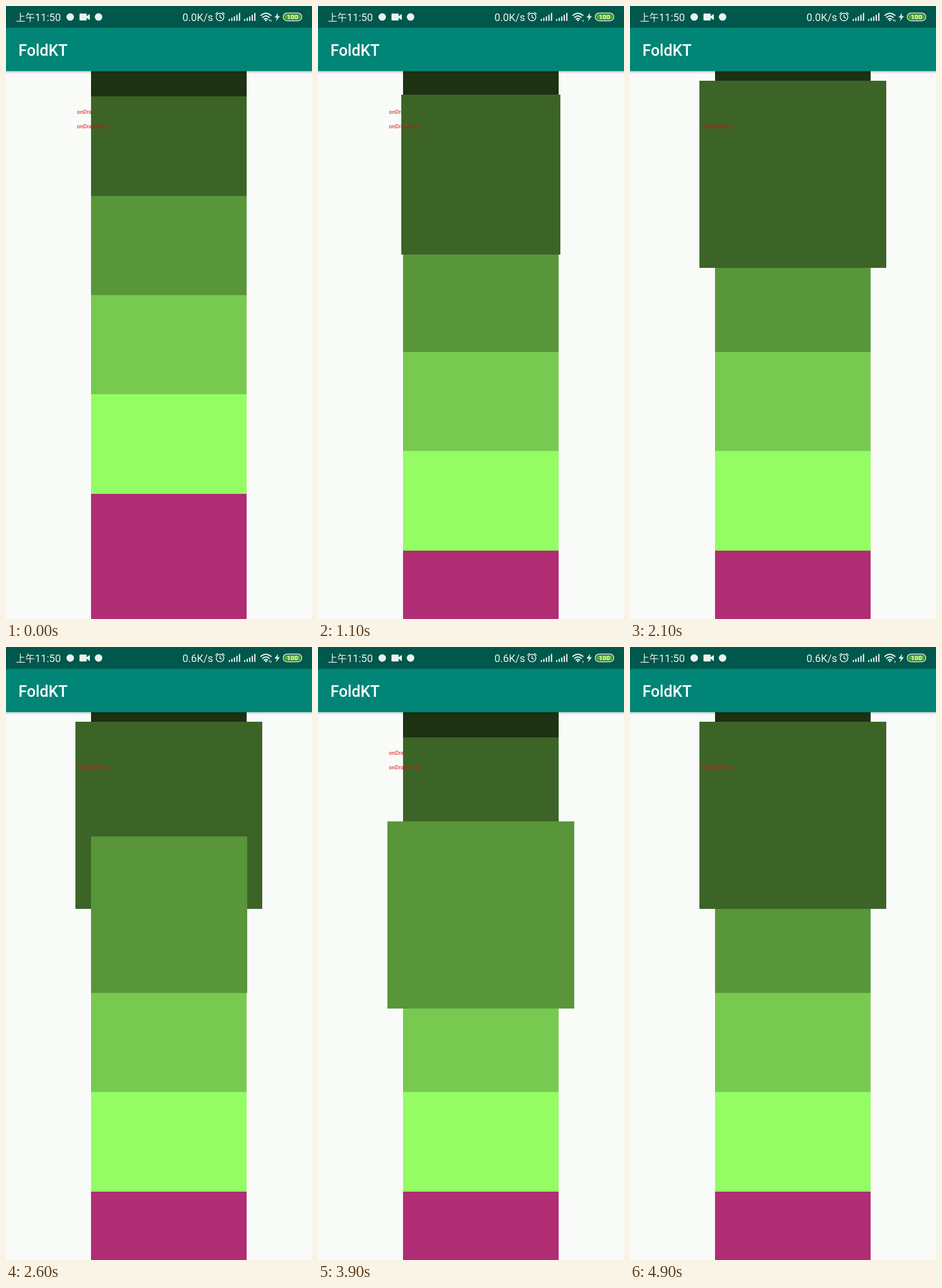
An HTML page that plays this animation: 529x1058 px, repeating every 5 s.

```html
<!DOCTYPE html>
<html lang="zh">
<head>
<meta charset="utf-8">
<style>
  html, body { margin: 0; width: 100%; height: 100%; overflow: hidden; background: #f9fbf9; }
  svg { display: block; width: 100vw; height: 100vh; font-family: Roboto, "Noto Sans CJK SC", "Noto Sans CJK", sans-serif; }
  .note { font-size: 9.8px; fill: #d21212; }
  .line { fill: none; stroke: #e8f2f0; stroke-linecap: round; }
</style>
</head>
<body>
<svg viewBox="0 0 529 1058">
  <defs>
    <linearGradient id="shade" x2="0" y2="1">
      <stop stop-color="#000" stop-opacity=".16"/>
      <stop offset="1" stop-color="#000" stop-opacity="0"/>
    </linearGradient>
    <g id="bars">
      <path d="M0 22.5h2.2v3.2h-2.2zM4.4 20.5h2.2v5.2h-2.2zM8.8 18h2.2v7.7h-2.2zM13.2 15.2h2.2v10.5h-2.2zM17.6 12h2.2v13.7h-2.2z"/>
    </g>
  </defs>
  <rect width="529" height="1058" fill="#f9fbf9"/>
  <text class="note" x="122.5" y="186.1">onDraw</text>
  <g id="items" shape-rendering="crispEdges"></g>
  <text class="note" x="122.5" y="210.6">onDrawOver</text>

  <rect y="112.5" width="529" height="5" fill="url(#shade)"/>
  <rect width="529" height="112.5" fill="#008577"/>
  <rect width="529" height="37.5" fill="#00574b"/>
  <text x="21.5" y="85.5" font-size="26.9" font-weight="500" fill="#fff">FoldKT</text>

  <g fill="#e8f2f0">
    <text x="17" y="26" font-size="16.5">上午</text>
    <text x="50" y="26" font-size="18">11:50</text>
    <circle cx="111" cy="19" r="6.5"/>
    <circle cx="160" cy="19" r="6.5"/>
    <rect x="127" y="13" width="12.5" height="12" rx="1.5"/>
    <path d="M139 18l6-4.5v11l-6-4.5z"/>
    <text id="speed" x="305" y="26" font-size="18"></text>
    <g class="line" stroke-width="1.5">
      <circle cx="370" cy="19" r="6.6"/>
      <path d="M370 15.5v4l2.8 1.2M362.4 14l3.4-2.8M377.6 14l-3.4-2.8"/>
    </g>
    <use href="#bars" x="385"/>
    <use href="#bars" x="411.5"/>
    <g class="line" stroke-width="2.1">
      <path d="M440.5 16.3q8.8-7.6 17.6 0M443.5 19.7q5.8-5 11.6 0M446.4 22.8q2.9-2.4 5.8 0"/>
    </g>
    <circle cx="449.3" cy="24.8" r="1.5"/>
    <path id="up" d="M454.4 24.6l1.4-2 .9 2h-.8v2h-.9v-2z"/>
    <path d="M457.6 23.4h.9v2h.8l-1.3 2-1.2-2h.8z"/>
    <path d="M470.5 11.8l-6.2 8.2h4l-1.8 6.2 7-8.6h-4.2z"/>
    <rect x="479.3" y="12.2" width="31.9" height="13.2" rx="6.6" fill="none" stroke="#e8f2f0" stroke-width="1.5"/>
    <rect x="481.3" y="14.2" width="27.9" height="9.2" rx="4.6" fill="#5dae20"/>
    <text x="495.3" y="22.9" font-size="11.3" font-weight="700" text-anchor="middle">100</text>
  </g>
</svg>
<script>
const LOOP = 5000, TICK = 100, GROW = 300;
const SIZE = 269.4, STEP = 171.43, CENTER = 281.6, TOP = -15.3;
const colors = ["#1d3113", "#3c6427", "#589639", "#78c950", "#94fd64", "#b12d74"];
// Moments at which an item takes the focus
const focus = [{ at: 1035, item: 1 }, { at: 2580, item: 2 }, { at: 4000, item: 1 }];

const byId = id => document.getElementById(id);
const list = byId("items"), speed = byId("speed"), up = byId("up");
const rects = colors.map(color => {
  const rect = document.createElementNS("http://www.w3.org/2000/svg", "rect");
  rect.setAttribute("fill", color);
  return list.appendChild(rect);
});

const ease = p => 0.5 - Math.cos(Math.PI * Math.min(1, Math.max(0, p))) / 2;

function place(rect, i, scale) {
  const side = SIZE * scale, middle = TOP + STEP * i + SIZE / 2;
  rect.setAttribute("x", CENTER - side / 2);
  rect.setAttribute("y", middle - side / 2);
  rect.setAttribute("width", side);
  rect.setAttribute("height", side);
}

// Ascending up to the focused item, the rest reversed, focused item on top
function drawOrder(selected) {
  const order = rects.map((_, i) => i);
  if (selected < 0) return order;
  return [...order.slice(0, selected), ...order.slice(selected).reverse()];
}

function draw(t) {
  const scales = colors.map(() => 1);
  let selected = -1;
  for (const { at, item } of focus) {
    if (t < at) break;
    const p = ease((t - at) / GROW);
    if (selected >= 0) scales[selected] = 1.2 - 0.2 * p;
    scales[item] = 1 + 0.2 * p;
    selected = item;
  }
  rects.forEach((rect, i) => place(rect, i, scales[i]));
  list.append(...drawOrder(selected).map(i => rects[i]));

  speed.textContent = t < 2400 ? "0.0K/s" : "0.6K/s";
  const oneArrow = t >= 3600 || (t >= 1000 && t < 1800);
  up.setAttribute("visibility", oneArrow ? "hidden" : "visible");
}

const start = performance.now();
function frame() {
  const t = (performance.now() - start) % LOOP;
  draw(Math.floor(t / TICK) * TICK);
  requestAnimationFrame(frame);
}
frame();
</script>
</body>
</html>
```
